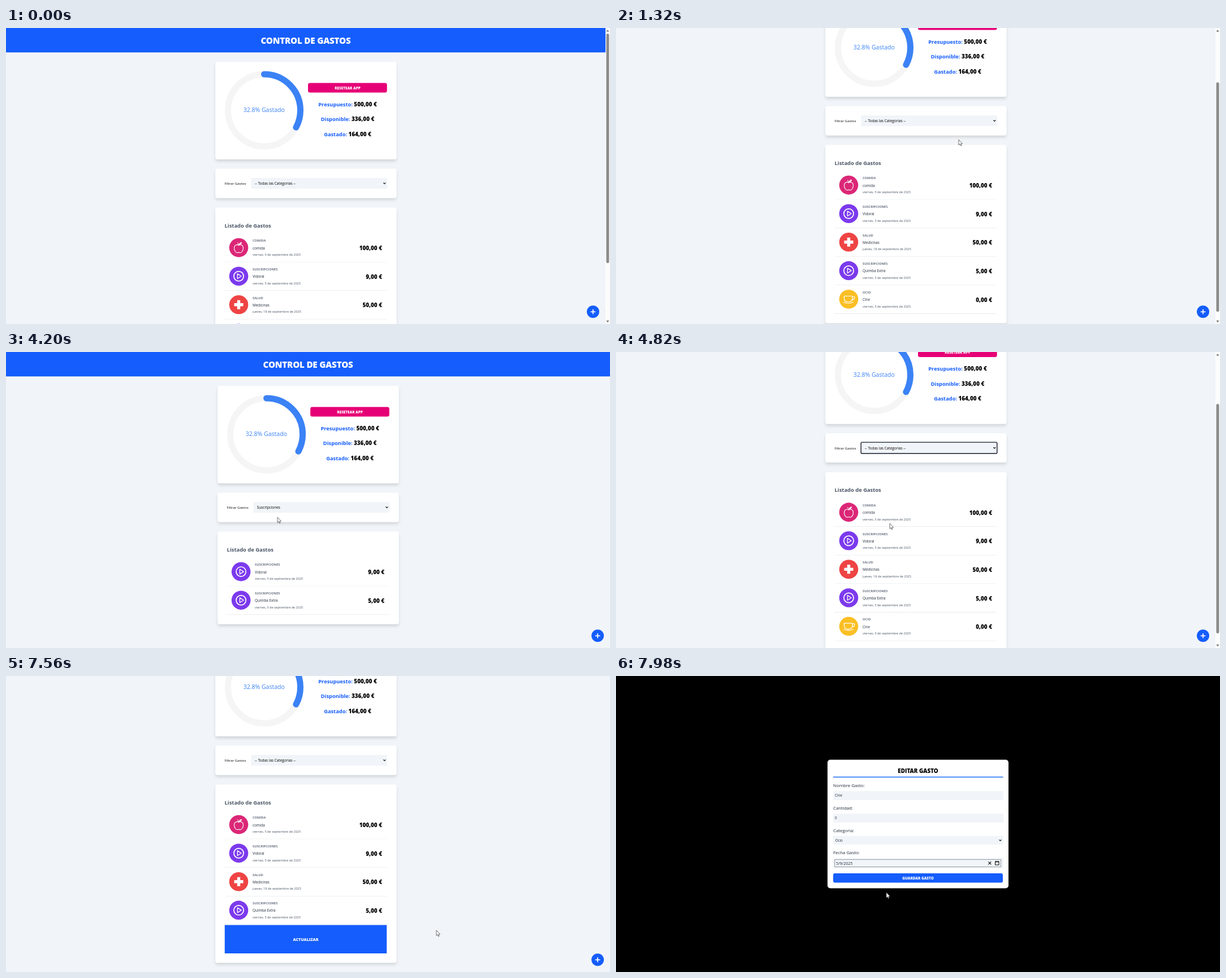
These frames come from a looping animation (1068x525 px, 8000 ms). An HTML page:

```html
<!DOCTYPE html>
<html lang="es">
<head>
<meta charset="utf-8">
<title>Control de gastos</title>
<style>
  html, body { margin: 0; width: 100%; height: 100%; overflow: hidden; background: #f1f5f9; }
  svg { display: block; font-family: "Open Sans", "Noto Sans", sans-serif; }
  .b { font-weight: 700; }
  .x { font-weight: 800; }
  .m { text-anchor: middle; }
  .e { text-anchor: end; }
  .line { fill: none; stroke: #fff; stroke-linecap: round; stroke-linejoin: round; }
</style>
</head>
<body>
<svg id="stage" width="1068" height="525" viewBox="0 0 1068 525"></svg>
<script>
const LOOP = 8000, VIEW = 525, ROW = 50.6, LIST_TOP = 365, LIST_LEFT = 386.5, LIST_W = 287;
const NOTCHES = 111, MAX_SCROLL = 126;
const BLUE = '#155dfc', FIELD = '#f1f5f9';

const text = (x, y, size, str, fill = '#000', cls = '') =>
  `<text x="${x}" y="${y}" font-size="${size}" fill="${fill}" class="${cls}">${str}</text>`;
const rect = (x, y, w, h, fill, r = 0, extra = '') =>
  `<rect x="${x}" y="${y}" width="${w}" height="${h}" rx="${r}" fill="${fill}" ${extra}/>`;
const card = (y, h, id = '') => rect(370.2, y, 320.3, h, '#fff', 4, `filter="url(#shadow)" ${id}`);
const chevron = (x, y) =>
  `<path d="M${x - 2} ${y - 1}l2 2 2-2" fill="none" stroke="#111" stroke-width="1.2"/>`;
const total = (y, label, value) =>
  text(604, y, 9.3, `${label}: <tspan class="x" fill="#000" font-size="9.9">${value} €</tspan>`, BLUE, 'b m');

const icons = {
  COMIDA: ['#db2777', `<path class="line" stroke-width="1.1" d="M0-4C-3-6.5-8-5-8 1C-8 6-4.5 9-2.5 9C-1 9-1 8.3 0 8.3S1 9 2.5 9C4.5 9 8 6 8 1C8-5 3-6.5 0-4ZM0-4Q0-7-2-8.5M1-6Q2-9 5-9Q4.5-6 1-6"/>`],
  SUSCRIPCIONES: ['#7c3aed', `<circle class="line" stroke-width="1.7" r="8.6"/><path class="line" stroke-width="1.3" d="M-2.2-4.3V4.3L4.6 0Z"/>`],
  SALUD: ['#ef4444', `<path fill="#fff" d="M-2.7-8h5.4v5.3H8v5.4H2.7V8h-5.4V2.7H-8v-5.4h5.3Z"/>`],
  OCIO: ['#fbbf24', `<path class="line" stroke-width="1.2" d="M-8-5.5H6.5V-1Q6.5 4.5-.8 5Q-8 4.5-8-1ZM6.5-4.5H9Q11-4.5 10.5-2.5Q9.5 1 6 1M-9 5.5Q-1 9 8 5.5"/>`]
};
const expenses = [
  ['COMIDA', 'comida', 'viernes, 5', '100,00'],
  ['SUSCRIPCIONES', 'Vidoral', 'viernes, 5', '9,00'],
  ['SALUD', 'Medicinas', 'jueves, 18', '50,00'],
  ['SUSCRIPCIONES', 'Quimba Extra', 'viernes, 5', '5,00'],
  ['OCIO', 'Cine', 'viernes, 5', '0,00']
];

const rowMarkup = ([category, name, day, amount], i) => {
  const [color, icon] = icons[category];
  const action = i === 4
    ? `<rect id="action" x="${LIST_LEFT}" height="${ROW}" fill="${BLUE}"/>
       <text id="actionText" y="28.2" font-size="7.1" fill="#fff" class="x m">ACTUALIZAR</text>` : '';
  return `<g id="row${i}"><g clip-path="url(#rowClip)">${action}<g id="body${i}">
    ${rect(LIST_LEFT, 0, LIST_W, ROW, '#fff')}
    ${rect(LIST_LEFT, ROW - .8, LIST_W, .8, '#e2e5ea')}
    <g transform="translate(411.5 24.6)"><circle r="16.8" fill="${color}"/>${icon}</g>
    ${text(436, 14.4, 5.7, category, '#6a7282', 'b')}
    ${text(436, 27.6, 6.35, name, '#1e2939')}
    ${text(436, 39.2, 5.53, day + ' de septiembre de 2025', '#4a5565')}
    ${text(665, 29.2, 9.9, amount + ' €', '#000', 'x e')}
  </g></g></g>`;
};

const field = (y, label, value, top, h) =>
  text(384, y, 7.85, label, '#1e2939') + rect(384, top, 301, h, FIELD) +
  text(387, top + h / 2 + 2.3, 6.3, value, '#1e2939');

const R = 64, LEN = 2 * Math.PI * R;

document.getElementById('stage').innerHTML = `
<defs>
  <filter id="shadow" filterUnits="userSpaceOnUse" x="350" y="40" width="360" height="630">
    <feDropShadow dx="0" dy="3.6" stdDeviation="2.6" flood-opacity=".13"/>
  </filter>
  <clipPath id="rowClip"><rect x="${LIST_LEFT}" y="0" width="${LIST_W}" height="${ROW}"/></clipPath>
</defs>
${rect(0, 0, 1068, VIEW, FIELD)}
<g id="page">
  ${rect(-10, 0, 1090, 43.3, BLUE)}
  ${text(530, 27.9, 15.2, 'CONTROL DE GASTOS', '#fff', 'x m" letter-spacing="-.2')}
  ${card(60, 173)}
  <g fill="none" stroke-width="11" transform="rotate(-90 456.5 146)">
    <circle cx="456.5" cy="146" r="${R}" stroke="#f5f5f5"/>
    <circle cx="456.5" cy="146" r="${R}" stroke="#3b82f6" stroke-linecap="round" stroke-dasharray="${LEN * .328} ${LEN}"/>
  </g>
  ${text(456.3, 149, 10.55, '32.8% Gastado', '#3b82f6', 'm')}
  ${rect(534, 97.5, 139.7, 17, '#e60076', 3.5)}
  ${text(604, 108.6, 6.35, 'RESETEAR APP', '#fff', 'x m')}
  ${total(138.5, 'Presupuesto', '500,00')}
  ${total(165.1, 'Disponible', '336,00')}
  ${total(191.7, 'Gastado', '164,00')}
  ${card(249.5, 52)}
  ${text(386.5, 278.1, 6.15, 'Filtrar Gastos', '#000')}
  ${rect(433.5, 266, 240.5, 19, FIELD)}
  <text id="filter" x="439.7" y="278.1" font-size="6.45"></text>
  ${chevron(669.3, 275.4)}
  ${rect(433.2, 265.6, 240.6, 19.8, 'none', 1.5, 'id="ring" stroke="#101828" stroke-width="1.4"')}
  ${card(318.6, 316, 'id="listCard"')}
  ${text(386.5, 353.9, 9.4, 'Listado de Gastos', '#4a5565', 'b')}
  ${expenses.map(rowMarkup).join('')}
</g>
<g id="fab"><circle cx="1038" cy="503.3" r="11" fill="${BLUE}"/>
  <path d="M1033.8 503.3h8.4M1038 499.1v8.4" stroke="#fff" stroke-width="1.7"/></g>
<g id="bar">
  ${rect(1060, 0, 8, VIEW, '#fcfcfc')}
  ${rect(1061.4, 10, 5, 407, '#8b8b8b', 2.5, 'id="thumb"')}
  <path d="M1061.2 6.5h5.4l-2.7-3.6ZM1061.2 518.8h5.4l-2.7 3.6Z" fill="#7d7d7d"/>
</g>
<rect id="shade" width="1068" height="${VIEW}"/>
<g id="modal">
  ${rect(374, 148.5, 320, 228, '#fff', 5)}
  ${text(534, 172.2, 9.9, 'EDITAR GASTO', '#000', 'x m')}
  ${rect(384, 178.4, 300.5, 1.8, '#3b82f6')}
  ${field(197.2, 'Nombre Gasto:', 'Cine', 204, 16)}
  ${field(237.2, 'Cantidad:', '0', 244, 16)}
  ${field(277.2, 'Categoria:', '&#8202;Ocio', 283.6, 15.5)}
  ${chevron(679.5, 291.4)}
  ${field(316.2, 'Fecha Gasto:', '', 322.6, 18.8)}
  ${rect(386.8, 325.6, 293.8, 12.8, FIELD, 0, 'stroke="#8a8f98" stroke-width=".9"')}
  ${text(389, 334.6, 7, '5/9/2025', '#1e2939')}
  <path d="M658.4 329.4l5 5m0-5l-5 5" stroke="#111" stroke-width="1.2"/>
  <path d="M670.6 329.2h6.4v5.8h-6.4ZM670.6 329.6h6.4M672 327.8v1M675.6 327.8v1" fill="none" stroke="#111" stroke-width="1.1"/>
  ${rect(384, 350, 300, 16.6, BLUE, 3)}
  ${text(534, 360.6, 6.4, 'GUARDAR GASTO', '#fff', 'x m')}
</g>
<path id="cursor" d="M0 0V9.6L2.2 7.6L3.6 10.9L5 10.3L3.7 7.1H6.6Z" fill="#fff" stroke="#333" stroke-width=".7"/>`;

const el = {};
document.querySelectorAll('[id]').forEach(n => el[n.id] = n);
const set = (id, name, value) => el[id].setAttribute(name, value);
const move = (id, x, y) => set(id, 'transform', `translate(${x} ${y})`);
const show = (id, on) => set(id, 'visibility', on ? 'visible' : 'hidden');

const progress = (t, a, b) => Math.min(1, Math.max(0, (t - a) / (b - a)));
const easeOut = p => 1 - (1 - p) ** 3;
const smooth = p => p * p * (3 - 2 * p);

// time, x, y of the pointer tip
const path = [
  [200, 1062, 260], [520, 650, 216], [720, 650, 216], [1300, 606, 198], [1580, 606, 198],
  [1940, 500, 164], [2599, 500, 164], [2600, 520, 262], [3160, 500, 284], [3300, 500, 284],
  [3840, 482, 281], [4199, 482, 281], [4200, 480, 293], [4279, 480, 293], [4460, 484, 304],
  [5540, 484, 304], [6160, 479, 465], [6400, 479, 465], [7160, 684, 462], [7260, 684, 462],
  [7540, 761, 451], [7580, 761, 451], [7960, 478, 384], [8000, 478, 384]
];
function pointer(t) {
  const i = Math.max(1, path.findIndex(k => k[0] > t));
  const [a, ax, ay] = path[i - 1], [b, bx, by] = path[i];
  const p = smooth(progress(t, a, b));
  return [ax + (bx - ax) * p, ay + (by - ay) * p];
}

function scrollAt(t) {
  if (t < 2600) return NOTCHES * easeOut(progress(t, 760, 1110));
  return NOTCHES * easeOut(progress(t, 4600, 4950)) +
    (MAX_SCROLL - NOTCHES) * easeOut(progress(t, 5540, 5740));
}

function draw(t) {
  const filtered = t >= 2600 && t < 4280, locked = t >= 7520;
  const scroll = scrollAt(t), [px, py] = pointer(t);

  move('page', filtered ? 4.1 : 0, -scroll);
  move('fab', filtered || locked ? 8.2 : 0, 0);
  show('bar', !filtered && !locked);
  set('thumb', 'y', 10 + scroll * 98 / MAX_SCROLL);
  el.filter.textContent = filtered ? 'Suscripciones' : '-- Todas las Categorias --';
  show('ring', (t >= 2600 && t < 3500) || (t >= 4280 && !locked));

  let count = 0;
  expenses.forEach(([category], i) => {
    const on = !filtered || category === 'SUSCRIPCIONES';
    set('row' + i, 'display', on ? 'inline' : 'none');
    if (on) move('row' + i, 0, LIST_TOP + ROW * count++);
  });
  set('listCard', 'height', 63 + ROW * count);

  const drag = t < 6400 ? 0 : locked ? LIST_W : Math.max(0, px - 479);
  move('body4', drag, 0);
  set('action', 'width', drag);
  set('actionText', 'x', LIST_LEFT + drag / 2);
  set('actionText', 'display', drag > 0 ? 'inline' : 'none');

  const open = easeOut(progress(t, 7570, 7900)), scale = .95 + .05 * open;
  set('shade', 'opacity', open);
  set('modal', 'opacity', open);
  set('modal', 'transform', `translate(534 262.5) scale(${scale}) translate(-534 -262.5)`);

  show('cursor', t >= 200);
  move('cursor', px, py);
}

function frame() {
  draw(performance.now() % LOOP);
  requestAnimationFrame(frame);
}
frame();
</script>
</body>
</html>
```
